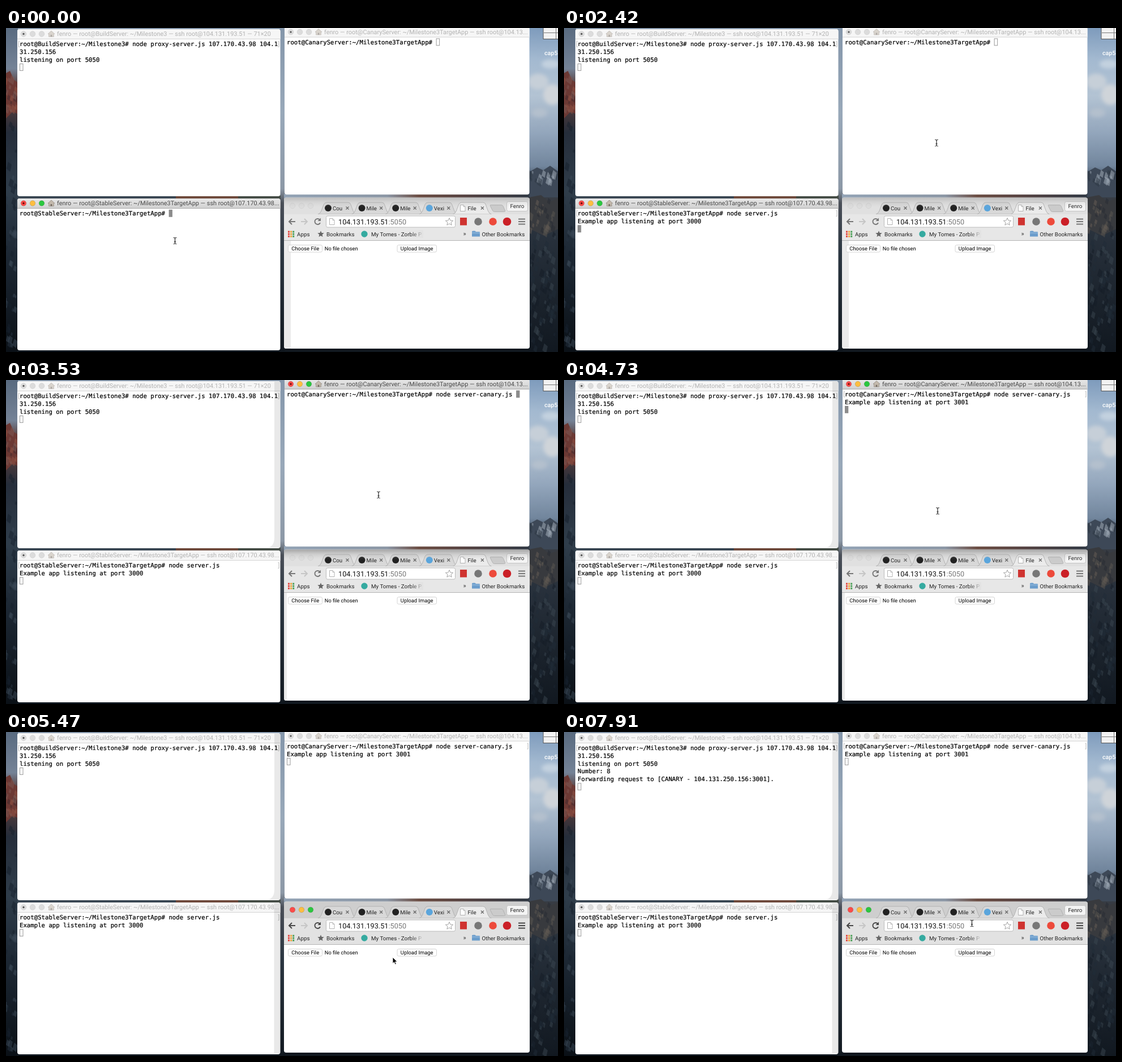
These frames come from a looping animation (975x574 px, 8 s). An HTML page:

```html
<!DOCTYPE html>
<html lang="en">
<head>
<meta charset="utf-8">
<title>Canary release demo</title>
<style>
html, body { margin: 0; width: 100%; height: 100%; overflow: hidden; background: #1c2530; }
svg { display: block; }
text { font-family: Roboto, Inter, sans-serif; white-space: pre; text-rendering: geometricPrecision; }
.mono { font: 10.68px "DejaVu Sans Mono", monospace; stroke: #000; stroke-width: .22px; }
</style>
</head>
<body>
<svg width="975" height="574" viewBox="0 0 975 574">
  <defs id="defs"></defs>
  <g id="desktop"></g>
  <g id="screen"></g>
  <g id="pointer"></g>
</svg>
<script>
const LOOP = 8000;
const $ = id => document.getElementById(id);
const USER = 'fenro';

const rect = (x, y, w, h, fill, more = '') =>
  `<rect x="${x}" y="${y}" width="${w}" height="${h}" fill="${fill}" ${more}/>`;
const disc = (x, y, r, fill, more = '') => `<circle cx="${x}" cy="${y}" r="${r}" fill="${fill}" ${more}/>`;
const path = (d, fill, more = '') => `<path d="${d}" fill="${fill}" ${more}/>`;
const line = (d, color, width = 1, more = '') =>
  path(d, 'none', `stroke="${color}" stroke-width="${width}" ${more}`);
const label = (x, y, s, size, fill = '#222', more = '') =>
  `<text x="${x}" y="${y}" font-size="${size}" fill="${fill}" ${more}>${s}</text>`;

// Vertical gradient with stops given in pixels.
const gradient = (id, y1, y2, stops) =>
  `<linearGradient id="${id}" gradientUnits="userSpaceOnUse" x1="0" x2="0" y1="${y1}" y2="${y2}">` +
  stops.map(([y, c, a = 1]) =>
    `<stop offset="${(y - y1) / (y2 - y1)}" stop-color="${c}" stop-opacity="${a}"/>`).join('') +
  '</linearGradient>';

$('defs').innerHTML =
  gradient('leftSky', 0, 574, [[0, '#596b80'], [72, '#748296'], [95, '#5d4d50'], [155, '#40353a'],
    [185, '#252d3a'], [290, '#2f3d4a'], [400, '#1d2834'], [574, '#0a1016']]) +
  gradient('rightSky', 0, 574, [[0, '#7e9bbc'], [55, '#a3b9d0'], [120, '#b3c3d3'], [185, '#93a6bc'],
    [245, '#71859c'], [275, '#353f4e'], [320, '#383a3d'], [365, '#28313c'], [574, '#111820']]) +
  gradient('midSky', 0, 574, [[0, '#8496aa'], [150, '#98a8b9'], [285, '#8c98a6'], [310, '#4a4f58'],
    [400, '#2b3641'], [574, '#11181f']]) +
  gradient('activeBar', 0, 1, [[0, '#e8e8e8'], [1, '#d0d0d0']])
    .replace('userSpaceOnUse', 'objectBoundingBox') +
  gradient('shade', 300, 318, [[300, '#777', .6], [309, '#999', .25], [318, '#bbb', 0]]) +
  '<clipPath id="browserClip"><rect x="491" y="300.5" width="434" height="267.5" rx="4"/></clipPath>' +
  '<filter id="soft" x="-50%" y="-50%" width="200%" height="200%"><feGaussianBlur stdDeviation="3"/></filter>' +
  '<linearGradient id="fadeOut"><stop offset="0" stop-color="#e2e2e2" stop-opacity="0"/>' +
  '<stop offset="1" stop-color="#e2e2e2"/></linearGradient>' +
  '<linearGradient id="gap"><stop offset="0" stop-color="#94a4b6"/><stop offset=".42" stop-color="#8d98a6"/>' +
  '<stop offset=".55" stop-color="#6d4f45"/><stop offset=".72" stop-color="#5a4644"/>' +
  '<stop offset="1" stop-color="#333b46"/></linearGradient>';

function desktop() {
  let seed = 11;
  const rnd = () => (seed = (seed * 16807) % 2147483647) / 2147483647;
  const rocks = (count, x, w, y, h, colors) => {
    let s = '';
    for (let i = 0; i < count; i++) {
      const a = x + rnd() * w, b = y + rnd() * h, r = 3 + rnd() * 6;
      s += path(`M${a} ${b}l${r * .7} ${r * .6} ${-r * .3} ${r * 1.4} ${-r * .8} ${-r * .6}z`,
        colors[Math.floor(rnd() * colors.length)], 'opacity=".5"');
    }
    return s;
  };
  const cloud = (x, y, rx, ry, c) => `<ellipse cx="${x}" cy="${y}" rx="${rx}" ry="${ry}" fill="${c}"/>`;
  return rect(0, 0, 975, 574, 'url(#midSky)') +
    rect(0, 0, 21, 574, 'url(#leftSky)') +
    path('M0 80L7 76 14 92 20 96V152L12 148 0 160z', '#6c3934') +
    rocks(22, -3, 20, 82, 66, ['#925344', '#3d282c', '#7d5a53']) +
    rocks(60, -4, 22, 165, 395, ['#3a4856', '#16202b', '#26323f']) +
    rect(20, 297, 465, 6, '#3a4753') + rect(300, 297, 110, 6, '#6f4a3c') +
    rect(410, 297, 75, 6, '#454d46') +
    rect(491, 294, 434, 8, 'url(#gap)') +
    rect(20, 569, 905, 5, '#10171e') +
    rect(924, 0, 51, 574, 'url(#rightSky)') +
    '<g filter="url(#soft)">' + cloud(962, 64, 16, 8, '#c3d1df') + cloud(940, 95, 18, 14, '#c6cfd8') +
    cloud(965, 118, 16, 18, '#cfd4d9') + cloud(942, 150, 14, 8, '#b4c0cd') + '</g>' +
    path('M924 255L938 247 949 252 961 244 975 254V300H924z', '#3d4857') +
    rocks(20, 924, 46, 250, 18, ['#a7b1bd', '#8491a0', '#2c3542']) +
    path('M924 300L945 296 960 308 975 302V356L950 368 924 355z', '#383a3e') +
    rocks(28, 922, 46, 296, 60, ['#5a5550', '#262a31', '#675d55']) +
    rocks(95, 922, 48, 360, 205, ['#394550', '#141c26', '#202b37']) +
    rect(949, -4, 30, 23.5, '#f2f2f2', 'stroke="#555"') +
    line('M950 8.5H975M971.5 0V19', '#777') +
    label(951, 48, 'cap5', 10.6, '#fff', 'font-weight="500"');
}

const lights = (x, y, active, dot) => ['#fb4b48', '#fdbe41', '#2bc73f'].map((c, i) =>
  disc(x + 16 * i, y, 4.8, active ? c : '#dcdcdc', `stroke="${active ? '#0003' : '#cecece'}" stroke-width=".7"`)
).join('') + (dot ? disc(x, y, 1.7, active ? '#6d0907' : '#555') : '');

const house = (x, y, active) => `<g opacity="${active ? 1 : .55}">` +
  path(`M${x - 6} ${y}l6-5.5 6 5.5h-1.6v5h-8.8v-5z`, '#c3b9ac', 'stroke="#8d857c" stroke-width=".7"') +
  rect(x - 1.3, y + 1.5, 2.6, 3.5, '#766d65') + '</g>';

const CHAR = 6.43, ROW = 13.7;

// rows: text lines; the caret sits after the last one.
function terminal({ x, y, w, h, bar, title, rows, active, marked }) {
  const left = x + 4, top = y + bar, first = top + 12.3;
  const caretX = left + rows.at(-1).length * CHAR, caretY = top + 1.8 + (rows.length - 1) * ROW;
  const caret = active
    ? rect(caretX, caretY, 6.3, 13, '#8c8c8c')
    : rect(caretX + .5, caretY + .5, 5.5, 12, 'none', 'stroke="#999"');
  const mid = top - 9.5;
  return rect(x, y, w, h, '#fff', 'rx="4"') +
    path(`M${x} ${top}V${y + 4}q0-4 4-4h${w - 8}q4 0 4 4V${top}z`, active ? 'url(#activeBar)' : '#f6f6f6') +
    line(`M${x} ${top - .5}h${w}`, active ? '#aaa' : '#d4d4d4') +
    lights(x + 11, mid, active, true) + house(x + 60, mid, active) +
    label(x + 70, mid + 3.8, title, 10.9, active ? '#484848' : '#b2b2b2') +
    (marked ? line(`M${x + 4} ${top + 3.5}h-1.5v10h1.5M${x + w - 4} ${top + 3.5}h1.5v10h-1.5`, '#aaa', .8) : '') +
    rows.map((s, i) => `<text class="mono" x="${left}" y="${first + i * ROW}">${s}</text>`).join('') + caret;
}

const star = (x, y, r) => 'M' + Array.from({ length: 10 }, (_, i) => {
  const a = i * Math.PI / 5, q = i % 2 ? r * .45 : r;
  return `${x + q * Math.sin(a)} ${y - q * Math.cos(a)}`;
}).join('L') + 'z';

const sheet = (x, y) => path(`M${x} ${y}h5.5l3 3v8h-8.5z`, '#fff', 'stroke="#aaa" stroke-width=".9"') +
  line(`M${x + 5.5} ${y}v3h3`, '#aaa', .8);

function tab(x, name, icon, front) {
  return path(`M${x - 2} 330q4-1 6-6l4-11q2-4 5-4h38q4 0 5 4l4 11q2 5 6 6z`, front ? '#ebebeb' : '#d8d8d8',
    'stroke="#a9a9a9" stroke-width=".8"') +
    (icon ? disc(x + 16, 319, 6, icon) : '') + label(x + 24, 322.5, name, 9.7, '#222') +
    line(`M${x + 47.5} 316.5l5 5m0-5l-5 5`, '#666', 1.2);
}

const button = (x, w, s) => rect(x, 384.5, w, 12.5, '#fff', 'rx="2.5" stroke="#d0d0d0" stroke-width=".9"') +
  label(x + 5.8, 394, s, 9.4, '#000');

function browser(t) {
  const active = t >= 5470, selected = t >= 6460 && t < 6910, loading = t >= 6910 && t < 7410;
  const ink = active ? '#474747' : '#777', toolbar = active ? '#e2e2e2' : '#e7e7e7';
  let s = rect(491, 300, 434, 268, '#fff') + rect(491, 300, 434, 31, active ? '#cecece' : '#e0e0e0') +
    lights(506, 315, active, false);
  [['Cou', '#222'], ['Mile', '#222'], ['Mile', '#222'], ['Vexi', '#5aa5dc'], ['File', '']]
    .forEach(([name, icon], i) => s += tab(553 + 59.6 * i, name, icon, i === 4));
  s += loading ? line(`M803 319a4.5 4.5 0 1 1 4.5 4.5`, '#888', 2, `transform="rotate(${t % 900 * .4} 807.5 319)"`)
    : sheet(802.5, 313.5);
  s += path('M856 313.5h19q2 0 3 2l3.5 8q1 2-2 2h-17q-2 0-3-2l-4-8q-1-2 .5-2z', '#cbcbcb', 'stroke="#aaa" stroke-width=".8"') +
    rect(884.5, 307.5, 37, 17, '#f4f4f4', 'rx="3" stroke="#c1c1c1" stroke-width=".9"') +
    label(890.5, 319.3, 'Fenro', 9.8);
  if (!active) s += rect(491, 300, 434, 18, 'url(#shade)', `opacity="${t < 2570 ? .6 : 1}"`);

  s += rect(491, 330, 434, 46, toolbar) + line('M491 376.5H925', '#b5b5b5') +
    line('M511 343H500m5-5l-5 5 5 5', ink, 2) + line('M521 343h11m-5-5l5 5-5 5', '#c6c6c6', 2) +
    line('M554.5 340a5 5 0 1 0 .5 5', ink, 1.9) + path('M556 336.5v5.5h-5.5z', ink) +
    (selected ? rect(565, 332.5, 228, 21, '#fff', 'rx="2.5" stroke="#5a9eea" stroke-width="2"')
      : rect(565.5, 333, 228, 20, '#fff', 'rx="2.5" stroke="#bcbcbc"')) +
    sheet(571.5, 337.5) + (selected ? rect(587, 335.5, 121, 15.5, '#a9cef6') : '') +
    label(587, 347.5, '104.131.193.51<tspan fill="#777">:5050</tspan>', 12.7, '#111') +
    path(star(783, 343.5, 7), '#fff', 'stroke="#999" stroke-width=".9"') +
    rect(802, 336, 12, 13.5, '#cf3330') + disc(834, 343, 6.8, '#777') +
    disc(860, 343, 6.8, '#ed4a3b') + disc(885, 343, 7.3, '#cb2027') +
    line('M905 338.5h12M905 343h12M905 347.5h12', ink, 2);

  const hues = ['#e2463f', '#eda23a', '#4a9f57', '#4285d4'];
  for (let i = 0; i < 9; i++)
    s += rect(498 + i % 3 * 4.1, 359.5 + Math.floor(i / 3) * 4.1, 3, 3, hues[(i + Math.floor(i / 3)) % 4]);
  s += label(514, 368.5, 'Apps', 9.8) + path(star(556, 365.2, 6), '#666') + label(566, 368.5, 'Bookmarks', 9.8) +
    disc(633, 365, 5.7, '#35aaa0') + label(645, 368.5, 'My Tomes - Zorble P', 9.8) +
    rect(714, 358, 24, 14, 'url(#fadeOut)') + rect(737, 358, 30, 14, toolbar) +
    label(807.5, 368, '»', 11, '#333') +
    path('M823 361q0-1.5 1.5-1.5h4l1.5 1.5h6q1 0 1 1v7.5h-14z', '#6b9dcc') + rect(823, 362.5, 14, 1, '#a6c5e3') +
    label(840.5, 368.5, 'Other Bookmarks', 9.8);

  if (!active) s += rect(491, 377, t < 2570 ? 12 : 5, 191, '#ebebeb');
  s += button(498.5, 60, 'Choose File') + label(562.8, 394, 'No file chosen', 9.25, '#000') +
    button(691, 69.5, 'Upload Image');
  return `<g clip-path="url(#browserClip)">${s}</g>`;
}

const latest = (t, steps) => steps.filter(([at]) => t >= at).at(-1)[1];

function screen(t) {
  const stablePrompt = 'root@StableServer:~/Milestone3TargetApp# ';
  const canaryPrompt = 'root@CanaryServer:~/Milestone3TargetApp# ';
  const stableRun = stablePrompt + 'node server.js', canaryRun = canaryPrompt + 'node server-canary.js';
  const proxyRows = ['root@BuildServer:~/Milestone3# node proxy-server.js 107.170.43.98 104.1',
    '31.250.156', 'listening on port 5050'];
  if (t >= 7080) proxyRows.push('Number: 8', 'Forwarding request to [CANARY - 104.131.250.156:3001].');
  const shadow = shape => `<g style="mix-blend-mode:multiply">${shape}</g>`;

  return terminal({
    x: 20, y: 2, w: 464.5, h: 296, bar: 18, active: false, marked: true, rows: [...proxyRows, ''],
    title: `${USER} — root@BuildServer: ~/Milestone3 — ssh root@104.131.193.51 — 71×20`
  }) + (t >= 2570 ? shadow(path('M474 3H484V297H462q12-2 12-18z', '#e9e9e9')) : '') +
  terminal({
    x: 20, y: 302, w: 464.5, h: 269, bar: 18, active: t < 2570, marked: t >= 1560,
    title: `${USER} — root@StableServer: ~/Milestone3TargetApp — ssh root@107.170.43.98...`,
    rows: latest(t, [[0, [stablePrompt]], [750, [stablePrompt + 'node ']], [960, [stableRun + ' ']],
      [1410, [stableRun, '']], [2130, [stableRun, 'Example app listening at port 3000', '']]])
  }) + (t >= 5470 ? shadow(rect(473.5, 303, 11, 267, '#e9e9e9')) : '') +
  terminal({
    x: 492, y: -2, w: 432.5, h: 297, bar: 18.6, active: t >= 2570 && t < 5470, marked: t >= 3980,
    title: `${USER} — root@CanaryServer: ~/Milestone3TargetApp — ssh root@104.13...`,
    rows: latest(t, [[0, [canaryPrompt]], [3020, [canaryPrompt + 'node ']], [3530, [canaryRun + ' ']],
      [3980, [canaryRun, '']], [4730, [canaryRun, 'Example app listening at port 3001', '']]])
  }) + browser(t);
}

const BEAM = line('M-2.8-5.8Q-.3-5.8 0-4.5 .3-5.8 2.8-5.8M0-4.5V4.5M-2.8 5.8Q-.3 5.8 0 4.5 .3 5.8 2.8 5.8M-1.5 1.8h3', '#111', 1.1);
const ARROW = path('M0 0V11.2L2.6 8.8 4.4 13 6.3 12.1 4.5 8.1H8z', '#000', 'stroke="#fff" stroke-width=".9"');

const POINTER = [
  [0, [BEAM, 298.5, 377]], [2130, [BEAM, 410, 323]], [2270, [BEAM, 560, 250]], [2420, [BEAM, 658, 203.5]],
  [4730, [BEAM, 660, 232]], [4880, [ARROW, 664, 322]], [5020, [ARROW, 669, 410]], [5170, [ARROW, 671, 450]],
  [5470, [ARROW, 683, 399]], [5650, [ARROW, 704, 363]], [5860, [ARROW, 715, 337]],
  [7730, [BEAM, 718, 338.5]], [7910, [BEAM, 720.5, 339]]
];

$('desktop').innerHTML = desktop();
const shown = {};
function show(id, markup) {
  if (shown[id] !== markup) $(id).innerHTML = shown[id] = markup;
}

function render(t) {
  show('screen', screen(t));
  const [shape, x, y] = latest(t, POINTER);
  show('pointer', `<g transform="translate(${x} ${y})">${shape}</g>`);
}

const start = performance.now();
function tick() {
  render((performance.now() - start) % LOOP);
  requestAnimationFrame(tick);
}
render(0);
requestAnimationFrame(tick);
</script>
</body>
</html>
```
